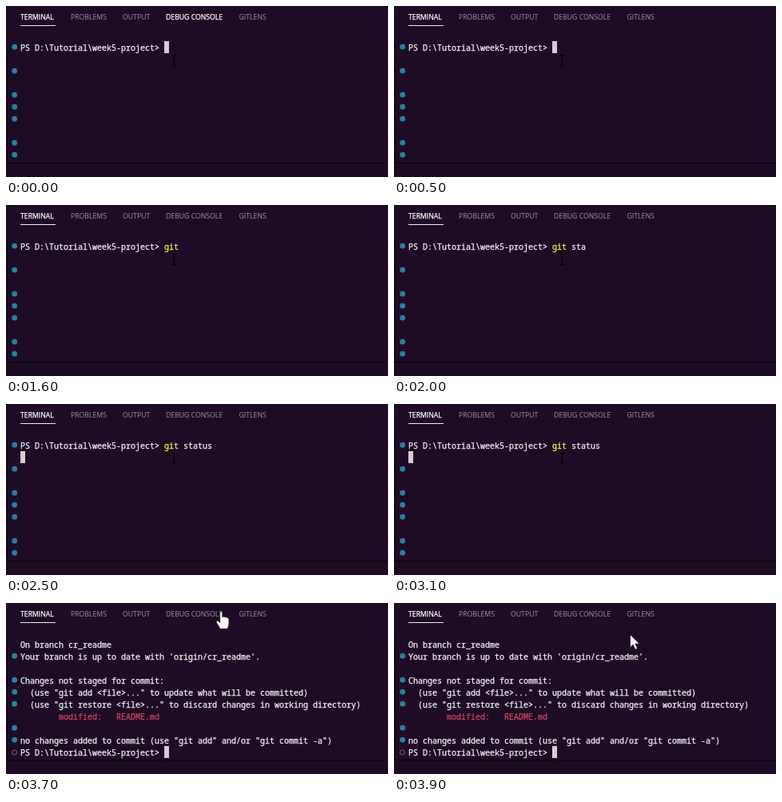
Recreate the animation shown at these times as an HTML page. Size 478 by 214 pixels, loop 4000 ms.

```html
<!DOCTYPE html>
<html lang="en">
<head>
<meta charset="utf-8">
<title>Terminal: git status</title>
<style>
html, body { margin: 0; width: 100%; height: 100%; overflow: hidden; background: #1e0c26; }
svg { display: block; width: 478px; height: 214px; }
text { white-space: pre; fill: currentColor; stroke: currentColor; }
.mono { font: 10px "Noto Sans Mono", monospace; color: #f6f3f7; stroke-width: .25; }
.tab { font: 8.7px "Open Sans", sans-serif; color: #94829f; stroke-width: .1; }
.tab.on { color: #fff; stroke-width: .25; }
.cmd { fill: #f6f34e; stroke: #f6f34e; }
.red { color: #cf4560; }
</style>
</head>
<body>
<svg id="stage" viewBox="0 0 478 214" xmlns="http://www.w3.org/2000/svg">
  <rect width="478" height="214" fill="#1e0c26"/>
  <rect y="197" width="478" height="17" fill="#1c0b23"/>
  <path d="M1.5 44V196M0 196.5H478" stroke="#09040c"/>
  <g id="tabs"></g>
  <path d="M18 24.5H62" stroke="#f0eaf2"/>
  <g id="dots" fill="#2c7f9f"></g>
  <circle id="ring" cx="10.5" cy="187" r="3" fill="none" stroke="#75687c"/>
  <text class="mono" id="line" x="18" y="55.5"></text>
  <g id="output"></g>
  <rect id="caret" width="6" height="15" fill="#d6ccd5"/>
  <path id="beam" fill="none" stroke="#050207" stroke-width="1.2"
    d="M-3 -6.5H-1L0 -5.5L1 -6.5H3M0 -5.5V5.5M-3 6.5H-1L0 5.5L1 6.5H3"/>
  <path id="hand" fill="#fff" stroke="#1a1020" stroke-width=".7"
    d="M-3 -10Q-1.5 -12 0 -10V-4Q1.5 -5.5 3 -4Q4.5 -5 5.7 -3.4Q8 -3.6 8.2 -1.5V4Q8 7 6.5 10.5H-3Q-4.5 7 -7.5 2.5Q-7.5 -.5 -5 .8L-3 3Z"/>
  <path id="arrow" fill="#fff" stroke="#1a1020" stroke-width=".7"
    d="M0 0V16L3.7 12.6L6.3 18.7L9 17.5L6.4 11.6H11.5Z"/>
</svg>
<script>
const NS = "http://www.w3.org/2000/svg";
const LOOP = 4000, STEP = 100, ROW = 15, CHAR = 6, LEFT = 18, BASE = 55.5;
const PROMPT = "PS D:\\Tutorial\\week5-project> ";
const COMMAND = "git status";
const TYPE_AT = 1400, ENTER_AT = 2400, OUTPUT_AT = 3300, DONE_AT = 3700;
const $ = id => document.getElementById(id);

function add(parent, tag, attrs, content = "") {
  const el = document.createElementNS(NS, tag);
  for (const key in attrs) el.setAttribute(key, attrs[key]);
  el.textContent = content;
  parent.appendChild(el);
  return el;
}

const show = (el, on) => el.setAttribute("display", on ? "inline" : "none");
const place = (el, x, y) => el.setAttribute("transform", `translate(${x} ${y})`);

const tabs = [["TERMINAL", 18], ["PROBLEMS", 81], ["OUTPUT", 146], ["DEBUG CONSOLE", 200], ["GITLENS", 291.5]]
  .map(([name, x], i) => add($("tabs"), "text", { class: i ? "tab" : "tab on", x, y: 17 }, name));

const dots = [0, 2, 4, 5, 6, 8, 9]
  .map(row => add($("dots"), "circle", { cx: 10.7, cy: 51.2 + row * ROW, r: 3.4 }));

[
  "On branch cr_readme",
  "Your branch is up to date with 'origin/cr_readme'.",
  "",
  "Changes not staged for commit:",
  "  (use \"git add <file>...\" to update what will be committed)",
  "  (use \"git restore <file>...\" to discard changes in working directory)",
  "        modified:   README.md",
  "",
  "no changes added to commit (use \"git add\" and/or \"git commit -a\")"
].forEach((line, row) => {
  const cls = line.includes("modified") ? "mono red" : "mono";
  add($("output"), "text", { class: cls, x: LEFT, y: BASE + row * ROW }, line);
});
const nextPrompt = add($("output"), "text", { class: "mono", x: LEFT, y: BASE + 9 * ROW }, PROMPT);

add($("line"), "tspan", {}, PROMPT);
const verb = add($("line"), "tspan", { class: "cmd" });
const args = add($("line"), "tspan", {});

// Pointer path: [time, x, y]
const path = [[0, 210.5, 68], [3200, 210.5, 68], [3500, 246, 4], [3900, 295.5, 39.5]];

function pointer(t) {
  let i = 1;
  while (i < path.length - 1 && t > path[i][0]) i++;
  const [t0, x0, y0] = path[i - 1], [t1, x1, y1] = path[i];
  const k = Math.min(1, (t - t0) / (t1 - t0));
  return [x0 + (x1 - x0) * k, y0 + (y1 - y0) * k];
}

function drawPointer(t) {
  const [x, y] = pointer(t);
  const kind = y < 24 ? "hand" : t > 3500 ? "arrow" : "beam";
  for (const id of ["beam", "hand", "arrow"]) {
    show($(id), id === kind);
    place($(id), x, y);
  }
}

function draw(ms) {
  const t = Math.floor((ms % LOOP) / STEP) * STEP;
  const printed = t >= OUTPUT_AT, done = t >= DONE_AT, entered = t >= ENTER_AT;

  const count = Math.max(0, Math.min(COMMAND.length, (t - TYPE_AT) / STEP + 1));
  const typed = COMMAND.slice(0, count);
  verb.textContent = typed.slice(0, 3);
  args.textContent = typed.slice(3);

  show($("line"), !printed);
  show($("output"), printed);
  show(nextPrompt, done);
  show($("ring"), done);

  // The finished output scrolls the view up by one row.
  place($("dots"), 0, printed ? -ROW : 0);
  show(dots[0], !printed);

  const row = printed ? 9 : entered ? 1 : 0;
  const col = done || !entered ? PROMPT.length : 0;
  place($("caret"), LEFT + col * CHAR, 44 + row * ROW);
  show($("caret"), t < TYPE_AT || entered);

  tabs[3].setAttribute("class", t < STEP ? "tab on" : "tab");
  drawPointer(t);
}

const start = performance.now();
function tick() {
  draw(performance.now() - start);
  requestAnimationFrame(tick);
}
draw(0);
requestAnimationFrame(tick);
</script>
</body>
</html>
```
